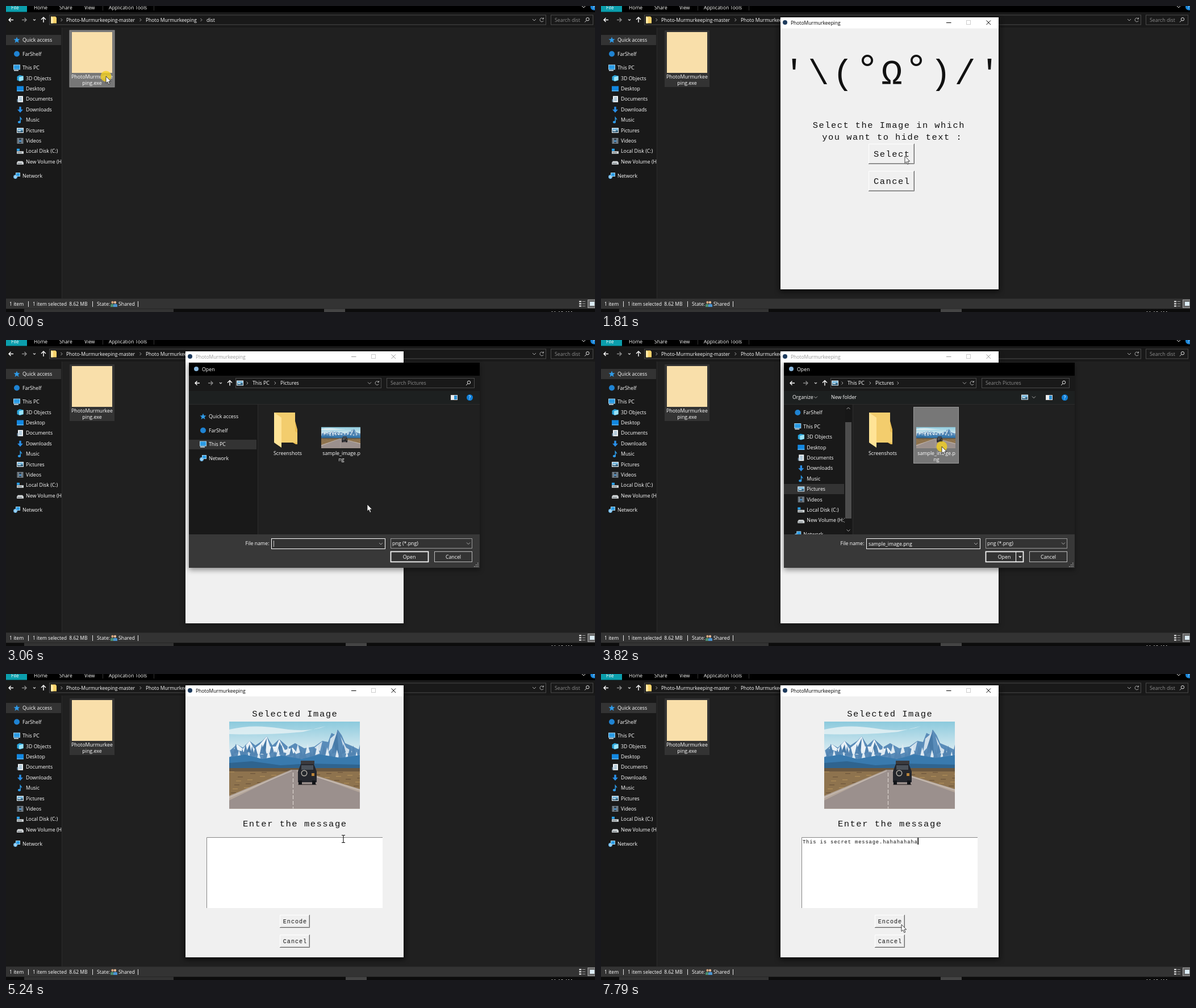
Animation, 1037 px wide and 540 px high, one loop 8 s. Source, as an HTML page:

```html
<!DOCTYPE html>
<html lang="en">
<head>
<meta charset="utf-8">
<title>Hide text in a picture</title>
<style>
  html, body { margin: 0; width: 100%; height: 100%; overflow: hidden; background: #202020; }
  svg { display: block; width: 100vw; height: 100vh; }
  text { font-family: "Open Sans", "Noto Sans", sans-serif; font-size: 8.8px; white-space: pre; }
  .mono { font-family: "Liberation Mono", monospace; letter-spacing: .0977em; }
  .ring { font-size: 71.7px; letter-spacing: 0; }
  .line { fill: none; stroke: #e6e6e6; stroke-width: 1; }
  .light { fill: none; stroke: #fff; }
  .dark { fill: none; stroke: #696969; }
  .down .light { stroke: #696969; }
  .down .dark { stroke: #fff; }
  .down text { transform: translate(1px, 1px); }
</style>
</head>
<body>
<svg id="stage" viewBox="0 0 1037 540" preserveAspectRatio="none"></svg>
<script>
const LOOP = 8000;
const APP = 'PhotoMurmurkeeping';
const MESSAGE = 'This is secret message.hahahahaha';

// drawing helpers
const rect = (x, y, w, h, fill, more = '') =>
  `<rect x="${x}" y="${y}" width="${w}" height="${h}" fill="${fill}" ${more}/>`;
const box = (x, y, w, h, stroke, fill = 'none', sw = 1) =>
  rect(x + .5, y + .5, w - 1, h - 1, fill, `stroke="${stroke}" stroke-width="${sw}"`);
const path = (d, fill, more = '') => `<path d="${d}" fill="${fill}" ${more}/>`;
const line = (d, color = '#e6e6e6', w = 1, more = '') => path(d, 'none', `stroke="${color}" stroke-width="${w}" ${more}`);
const dot = (x, y, r, fill) => `<circle cx="${x}" cy="${y}" r="${r}" fill="${fill}"/>`;
const move = (x, y, body, more = '') => `<g transform="translate(${x} ${y})" ${more}>${body}</g>`;
const group = (id, body, more = '') => `<g id="${id}" ${more}>${body}</g>`;
const text = (x, y, s, fill = '#fff', anchor = 'start', size = 8.8) =>
  `<text x="${x}" y="${y + 3.1}" fill="${fill}" text-anchor="${anchor}" style="font-size:${size}px">${s}</text>`;
// small letters, widely set, with a pitch of .6 size
const mono = (x, y, s, size, more = 'text-anchor="middle"') =>
  `<text class="mono" x="${x + .042 * size}" y="${y}" style="font-size:${.86 * size}px" fill="#111" ${more}>${s}</text>`;
const chevron = (x, y, c = '#aaa') => line(`M${x - 1.5} ${y - 2.5}l2.5 2.5-2.5 2.5`, c);
const drop = (x, y, c = '#aaa') => line(`M${x - 3} ${y - 1.5}l3 3 3-3`, c);
const repeat = (n, make) => Array.from({ length: n }, (_, i) => make(i)).join('');

function button(id, x, y, w, h, label, size, base) {
  return group(id, rect(x, y, w, h, '#f0f0f0') +
    `<path class="light" d="M${x + .5} ${y + h}V${y + .5}H${x + w}"/>` +
    `<path class="dark" d="M${x} ${y + h - .5}H${x + w - .5}V${y}"/>` +
    line(`M${x + 1} ${y + h - 1.5}H${x + w - 1.5}V${y + 1}`, '#b8b8b8') +
    mono(x + w / 2, base, label, size));
}

const icons = {
  star: path('M0-5.5L1.5-1.8 5.5-1.6 2.4 1 3.5 5 0 2.8-3.5 5-2.4 1-5.5-1.6-1.5-1.8Z', '#2f9be8'),
  disc: dot(0, 0, 5, '#1f83d2'),
  pc: box(-6, -5.5, 12, 9, '#a8d8f4', '#2a9be4') + rect(-5, 4, 8, 1.6, '#c8dce8'),
  cube: path('M-5.5-3L-1-5.5 5.5-4V3.5L0 5.5-5.5 3.5Z', '#2aa5dc') + path('M-2-2L5.5-4V3.5L-2 5Z', '#9be3f7'),
  desk: rect(-6, -4.5, 12, 9, '#1287e0') + rect(-6, 3, 12, 1.5, '#5db8f5'),
  doc: rect(-4, -5.5, 9, 11, '#eef3f6') + line('M-2-2.5H3M-2 0H3M-2 2.5H3', '#5b8db0') + rect(-5.5, 0, 2, 5, '#6f8ea6'),
  down: path('M-1.7-5H1.7V0H5L0 5.5-5 0H-1.7Z', '#2a8fe8'),
  note: path('M0-6C1-3 4-3 3 1 2.5-1 1.5-1.5 1-1.5V3.5A2.6 2 0 1 1-.5 2V-6Z', '#2f9be8'),
  pic: box(-6, -4.5, 12, 9, '#f0f4f6', '#79b9df') + rect(-5, 0, 10, 3.5, '#35627e') + rect(-4, 0, 5, 1.5, '#e8f0f0'),
  film: box(-5.5, -5, 11, 10, '#85909a', '#35424d') + line('M-3-4V4M3-4V4', '#b8c1c7') + rect(-2, -1, 4, 3, '#4c8cc0'),
  disk: rect(-6, 0, 12, 4.5, '#d2d6d8') + rect(-5, 2, 8, 1, '#59646a') + rect(-6, -4.5, 5, 4, '#2aa0e8'),
  vol: path('M-4-1H4L6 1.5V5H-6V1.5Z', '#d2d6d8') + rect(-5, 2.5, 8, 1, '#59646a'),
  net: box(-2, -5.5, 8, 7, '#a8d8f4', '#2a9be4') + dot(-2.5, 2, 3.4, '#6db9ea') + line('M-5 2H1M-2.5-1V5', '#d5ecf8', .7)
};
const icon = (name, x, y) => move(x, y, icons[name]);
const folderSmall = move(79, 18.5, path('M0 0H8L10 2V12H0Z', '#f9d36b') + path('M0 0L4 2V12H0Z', '#ffe9a6'));

// the tree of places, shared by both file windows
const places = [['Quick access', 'star', 60], ['FarShelf', 'disc', 84.5], ['This PC', 'pc', 109]];
[['3D Objects', 'cube'], ['Desktop', 'desk'], ['Documents', 'doc'], ['Downloads', 'down'], ['Music', 'note'],
 ['Pictures', 'pic'], ['Videos', 'film'], ['Local Disk (C:)', 'disk'], ['New Volume (H:)', 'vol']]
  .forEach(([name, kind], i) => places.push([name, kind, 127.5 + 18.4 * i, 6]));
places.push(['Network', 'net', 299.5]);
const place = ([name, kind, y, indent = 0]) => icon(kind, 19 + indent, y) + text(29 + indent, y, name);
const tree = places.map(place).join('');

// arrows, address field and search field
function addressBar(dx, y, width, searchX, searchW, hint) {
  const right = 76 + dx + width;
  return move(dx, y, line('M13 0H5M8.5-3.5L5 0 8.5 3.5', '#fff', 1.4) + line('M28 0H36M32.5-3.5L36 0 32.5 3.5', '#8a8a8a', 1.4) +
      line('M48-1L50 1 52-1', '#ccc', 1.2) + line('M66 4.5V-4M62-.5L66-4.5 70-.5', '#fff', 1.4)) +
    box(76 + dx, y - 9, width, 18, '#4a4a4a') + drop(right - 21, y) +
    line(`M${right - 5} ${y - 2}a3.3 3.3 0 1 0 .3 3.5M${right - 4.5} ${y - 4}v2.5h-2.5`, '#aaa') +
    box(searchX, y - 9, searchW, 18, '#4a4a4a') + text(searchX + 7, y, hint, '#8c8c8c') +
    move(searchX + searchW - 11, y, `<circle cx="1" cy="-1.2" r="2.7" class="line"/>` + line('M-1 1L-4 4'));
}

// flat road picture, 230 by 154
const snow = i => path(`M${i * 5.75} ${(46 + 7 * Math.sin(i * 2.3)).toFixed(1)}l4 15-8 3Z`, i % 3 ? '#5284b2' : '#dfeaf2');
const grass = i => rect(i * 71 % 230, 88 + i * 13 % 44, 9, 1.3, i % 2 ? '#6f573c' : '#ad8c58');
const photo = `<g clip-path="url(#photoClip)">` + rect(0, 0, 230, 154, 'url(#sky)') +
  path('M0 14Q40 4 90 12T170 8L130 18Q70 24 0 22Z', '#e9f3f6', 'opacity=".8"') +
  path('M0 52L14 40 24 46 36 34 46 42 58 34 66 26 76 42 88 31 104 45 116 38 132 47 150 44 164 34 174 36 180 20 186 23 191 14 198 24 204 38 216 43 230 50V90H0Z', '#5a8cb9') +
  path('M8 48L14 40 24 48 36 34 44 48 54 40 66 26 72 44 82 44 88 31 98 50 112 46 120 56 96 55 78 54 58 58 34 56Z', '#eaf2f7') +
  path('M178 30L186 23 190 15 187 40 174 54Z M196 26L206 46 222 56 204 56Z M150 46L164 35 160 52Z', '#cfdfeb') +
  path('M54 56L66 29 64 58Z M84 54L89 36 96 56Z M30 54L36 40 39 56Z M181 46L190 18 193 56Z', '#477aa8') +
  repeat(41, snow) +
  path('M0 63L28 58 58 66 92 60 128 66 160 58 196 64 230 59V90H0Z', '#397aae') +
  path('M0 73L40 70 90 77 140 74 230 76V92H0Z', '#2f648f') +
  rect(0, 83, 230, 71, '#8e734e') + path('M0 82H230V88H0Z', '#6b573f') + repeat(70, grass) +
  path('M109 85H120L230 119V154H0V131Z', '#b5a79c') + path('M111 85H118L230 125V154H0V139Z', '#9b908d') +
  line('M110 87L0 134M119 87L230 121', '#cfc5bc', 1) +
  line('M112.5 90V154', '#d9d2cd', 1.2, 'stroke-dasharray="7 3"') +
  path('M122 110H153L154 112H121Z', '#5c5352') + path('M126 75H149L154 88V107H121V88Z', '#24262c') +
  rect(126, 69, 24, 6, '#3b3a3d') + rect(127, 77, 21, 8, '#4b525a') + rect(122, 104, 6, 7, '#121418') + rect(146, 104, 6, 7, '#121418') +
  dot(132, 91, 5.5, '#b5b1a8') + dot(132, 91, 4, '#25282d') + rect(145, 91, 5, 5, '#b98338') + `</g>`;

const explorer = rect(0, 0, 1037, 540, '#202020') + rect(0, 10, 1037, 28, '#191919') + rect(0, 38, 99, 478, '#191919') +
  rect(0, 0, 1037, 11, '#000') + rect(0, 0, 37, 10.5, '#0b9eac') + line('M170.5 0V8M260.5 0V8', '#333') +
  [['File', 9], ['Home', 49], ['Share', 94], ['View', 138], ['Application Tools', 181]].map(([s, x]) => text(x, 2.5, s, '#fff', 'start', 8.5)).join('') +
  drop(1017, 1.5, '#ddd') + dot(1035, 1.5, 6, '#1784d8') + text(1032.5, 1.5, '?') +
  addressBar(0, 24.5, 875, 959, 75, 'Search dist') + folderSmall +
  [98, 237, 344].map(x => chevron(x, 24.5)).join('') +
  text(106, 24.5, 'Photo-Murmurkeeping-master', '#fff', 'start', 8.5) + text(246, 24.5, 'Photo Murmurkeeping', '#fff', 'start', 8.5) + text(353, 24.5, 'dist') +
  line('M98.5 38V516', '#2b2b2b') + rect(0, 51, 97, 18, '#333') + `<g clip-path="url(#treeClip)">${tree}</g>` +
  rect(112, 43, 79, 100, '#333', 'id="tile"') + rect(116, 46, 71, 72, '#f9dfaa') +
  text(151.5, 124.5, 'PhotoMurmurkee', '#fff', 'middle') + text(151.5, 136, 'ping.exe', '#fff', 'middle') +
  rect(0, 516.5, 1037, 18, '#333') + text(6, 526, '1 item', '#fff', 'start', 8.6) +
  text(47, 526, '1 item selected  8.62 MB', '#fff', 'start', 8.5) + text(160, 526, 'State:') + text(198, 526, 'Shared') +
  line('M39.5 521V531M152.5 521V531M232.5 521V531') +
  dot(187.5, 523, 2.2, '#d2a27d') + dot(192, 523, 2.2, '#e4b894') + path('M184 531V527Q187 524 190 527V531Z', '#4b8c6f') + path('M189 531V527Q193 524 196 527V531Z', '#4b93d0') +
  line('M1009 521.5H1013M1009 525.5H1013M1009 529.5H1013', '#eee', 2) + line('M1014.5 521.5H1020M1014.5 525.5H1020M1014.5 529.5H1020', '#999') +
  box(1024, 518, 15, 15, '#a0a0a0', '#666') + rect(1028, 522, 8, 7, '#dcecf5') +
  rect(0, 534.5, 1037, 6, '#0c0c0c') + rect(32, 534.5, 263, 6, '#333') +
  rect(560, 534.5, 37, 6, '#444', 'id="task"') + text(959, 542.5, '11:19 AM');

// opening page of the app
const bouquet = String.raw`@(oo)
(oo)-{*}-)@
@(={*}=)/\)(oo)
(oo(/\)@| (-{*}-)
(={*}=)@(oo)@(/\)
(/\)\(={*}=)/(oo)
@(oo)\(/\)/(={*}=)
(-{*}-)****@/(/\)
|::   |
/::     \
/:::      \
|::        |
|::        |
\::.      /
':______.'
~~~~~~~~`.split('\n');
const menuPage = mono(508, 76, 'Photo Murmurkeeping', 33.3) +
  button('menuEncode', 466, 95, 84, 29, 'Encode', 14.1, 114) + button('menuDecode', 466, 143, 84, 29, 'Decode', 14.1, 162) +
  mono(508, 240, '¯\\_(ツ)_/¯', 61.4) +
  bouquet.map((s, i) => mono(508, 281 + 13.7 * i, s, 12.8, 'text-anchor="middle" font-weight="bold"')).join('');

const ring = next => `<tspan class="ring" dx="-3" dy="-3">°</tspan><tspan dx="3" dy="3">${next}</tspan>`;
const selectPage = mono(512, 137, `'\\(${ring('Ω')}${ring(')')}/'`, 71.7) +
  mono(372, 215, 'Select the Image in which', 17.9, '') + mono(512, 236, 'you want to hide text :', 17.9) +
  button('pick', 471, 243, 81, 36, 'Select', 17.9, 266) + button('quit', 471, 291, 81, 36, 'Cancel', 17.9, 314);

const messagePage = mono(508, 75, 'Selected Image', 18) + move(393, 84, photo) +
  mono(508, 268.5, 'Enter the message', 18) +
  rect(353, 288, 310, 125, '#fff') + line('M353.5 413V288.5H663', '#858585') +
  mono(354.5, 298.5, '', 10.25, 'id="typed"') + rect(0, 289, 1.6, 12, '#000', 'id="caret"') +
  button('encode', 482, 425, 53, 23, 'Encode', 11.8, 440) + button('cancel', 482, 460, 53, 23, 'Cancel', 11.8, 475);

const shadow = (id, x, y, w, h) => rect(x, y, w, h, '#000', `id="${id}" filter="url(#blur)"`);
const app = shadow('appShadow', 314, 24, 388, 480) + rect(316, 20, 384, 480, '#f0f0f0') + rect(316, 20, 384, 19.5, '#fff') +
  dot(324, 29, 4, '#1d3a5c') +
  group('appTitle', text(334, 29.5, APP, 'currentColor', 'start', 8.5) + line('M608 29.5H616.5M678.5 25.5L686 33M686 25.5L678.5 33', 'currentColor')) +
  box(643, 25, 8, 8, '#ccc') + group('menu', menuPage) + group('select', selectPage) + group('message', messagePage);

// file chooser
const folder = path('M472 128H505L513 158V184H510L505 181H472Z', '#e9bd55') +
  path('M472 128H509V161L513 164V181H482Z', '#f3cd6d') + path('M472 128L485 137V190L472 181Z', '#ffe396');
const chooserSkeleton = rect(322, 40, 512, 362, '#fff') + rect(322, 40, 512, 24, '#000') + rect(322, 343, 512, 59, '#383838') +
  rect(422, 353, 41, 12, '#fff') + rect(467, 350, 200, 18, '#fff') + rect(676, 350, 145, 17, '#fff') +
  rect(676, 372, 68, 20, '#fff') + rect(753, 372, 68, 20, '#fff') + rect(821, 389, 13, 13, '#fff');
const collapsed = move(328, 75, rect(-6, 101, 119, 17, '#333') + places.slice(0, 3).map(place).join('')) + move(328, -91, place(places[12]));
const expanded = text(337, 101, 'Organize') + drop(378, 101) + text(405, 101, 'New folder') +
  icon('pic', 746, 101) + drop(762, 101) + chevron(523, 76) + rect(322, 254, 106, 18, '#333') +
  `<g clip-path="url(#chooserClip)">${move(327.3, 43.5, tree)}</g>` +
  rect(430, 114, 11, 229, '#171717') + rect(430, 145, 11, 170, '#4d4d4d') + drop(435.5, 336) + line('M432.5 122L435.5 119 438.5 122', '#aaa') +
  line('M730.5 374V391', '#fff') + path('M735 381.5H741L738 384.5Z', '#fff');
const chooserBody = rect(322, 40, 512, 362, '#202020') + rect(322, 40, 512, 50, '#191919') + rect(322, 40, 512, 23, '#000') +
  rect(322, 90, 512, 24, '#1d2020') + rect(322, 114, 121, 229, '#191919') + line('M443.5 114V343M322 113.5H834', '#2c2c2c') +
  addressBar(328, 76, 257, 670, 155, 'Search Pictures') + icon('pic', 412, 76) + chevron(425, 76) + text(434, 76, 'This PC') +
  chevron(474, 76) + text(483, 76, 'Pictures') +
  box(783, 97, 12, 9, '#ddd', '#eee') + rect(789, 98, 5, 7, '#2f8fd0') + dot(816.5, 101.5, 5.5, '#0f7fd8') + text(816.5, 101.5, '?', '#fff', 'middle') +
  group('picked', box(550, 118, 80, 100, '#999', '#777')) + folder + text(496, 199.5, 'Screenshots', '#fff', 'middle') +
  move(555, 153.5, `<g transform="scale(.3 .242)">${photo}</g>`) +
  text(590.5, 199.5, 'sample_image.p', '#fff', 'middle') + text(590.5, 211, 'ng', '#fff', 'middle') +
  rect(322, 343, 512, 59, '#383838') + text(463.5, 359, 'File name:', '#fff', 'end') +
  box(467, 350, 201, 19, '#fff', '#333') + drop(660, 359.5) + box(677, 350, 144, 18, '#999', '#333') + text(680, 359, 'png (*.png)') + drop(814, 359) +
  group('fileName', text(471, 359.5, 'sample_image.png')) + group('fileCaret', line('M471.5 354V365', '#ccc')) +
  box(677, 373, 67, 19, '#fff', '#333', 1.7) + text(710, 382.5, 'Open', '#fff', 'middle') +
  box(754, 373, 67, 19, '#bbb', '#333') + text(787.5, 382.5, 'Cancel', '#fff', 'middle') +
  [[830, 394], [830, 397], [827, 397], [830, 400], [827, 400], [824, 400]].map(([x, y]) => rect(x, y - 1, 1.5, 1.5, '#aaa')).join('') +
  group('collapsed', collapsed) + group('expanded', expanded);
const chooser = shadow('chooserShadow', 322, 44, 512, 362) + group('body', chooserBody) + group('skeleton', chooserSkeleton) +
  group('chooserIcon', dot(335, 51, 4, '#87b6dc')) + group('chooserTitle', text(345, 51.5, 'Open'));

const clip = (id, x, y, w, h) => `<clipPath id="${id}">${rect(x, y, w, h, '#000')}</clipPath>`;
stage.innerHTML = `<defs><filter id="blur" x="-10%" y="-10%" width="120%" height="120%"><feGaussianBlur stdDeviation="5"/></filter>
  <linearGradient id="sky" x2="0" y2="1"><stop stop-color="#8ccadd"/><stop offset=".35" stop-color="#dcecf2"/></linearGradient>` +
  clip('treeClip', 0, 38, 98, 478) + clip('chooserClip', 322, 114, 107, 229) + clip('photoClip', 0, 0, 230, 153.5) + '</defs>' +
  explorer + group('app', app) + group('chooser', chooser) + group('pointer',
    group('halo', dot(0, 0, 9.5, '#f2d020'), 'opacity=".8"') +
    group('arrow', path('M0 0V12.2L2.8 9.7 4.8 14.4 6.8 13.5 4.9 9H8.6Z', '#fff', 'stroke="#111" stroke-width=".8"')) +
    group('beam', line('M-3-6.5H-1Q0-6.5 0-5.5 0-6.5 1-6.5H3M0-6V6M-3 6.5H-1Q0 6.5 0 5.5 0 6.5 1 6.5H3', '#111', 1.1)));

// step tables: time, then values held until the next row
const pointerSteps = [[0, 176, 124], [390, 215, 122], [470, 300, 118], [550, 400, 112], [630, 470, 110], [710, 515, 109], [790, 531, 109], [870, 535, 109],
  [1570, 535, 130], [1650, 535, 190], [1730, 535, 245], [1810, 535, 265], [2190, 538, 265], [2900, 556, 270], [2980, 604, 283], [3060, 636, 290],
  [3290, 630, 262], [3360, 618, 230], [3440, 607, 205], [3520, 602, 192], [3590, 600, 188],
  [5070, 600, 215], [5150, 598, 252], [5240, 594, 291], [5320, 576, 302], [5390, 566, 306],
  [6930, 564, 325], [7010, 556, 360], [7090, 545, 400], [7170, 535, 428], [7250, 530, 440], [7330, 529, 442]];
const appSteps = [[0, 0, .95], [230, .35, .965], [310, .8, .99], [390, 1, 1]];
const chooserSteps = [[0, 0, 1], [2830, .36, .968], [2900, .8, .99], [2980, 1, 1], [3990, .75, .99], [4070, .48, .977], [4150, .23, .965], [4230, 0, 1]];
const haloSpans = [[0, 150], [1250, 1400], [2190, 2340], [3820, 4230], [5560, 5710]];
const caretSpans = [[5560, 6170], [6480, 7090], [7330, 7560], [7790, LOOP]];

const $ = id => document.getElementById(id);
const at = (steps, t) => steps.findLast(s => s[0] <= t).slice(1);
const within = (spans, t) => spans.some(([a, b]) => t >= a && t < b);
const show = (id, on) => $(id).style.display = on ? '' : 'none';
const fade = (id, [alpha, scale], x, y) => {
  show(id, alpha > 0);
  $(id).setAttribute('opacity', alpha);
  $(id).setAttribute('transform', `translate(${x} ${y}) scale(${scale}) translate(${-x} ${-y})`);
};

function draw(t) {
  const opened = t >= 230, active = t < 2340 || t >= 3990, closing = t >= 3990;
  $('tile').setAttribute('fill', opened ? '#333' : '#777');
  $('tile').setAttribute('stroke', opened ? 'none' : '#919191');
  $('task').setAttribute('x', opened ? 598 : 560);
  fade('app', at(appSteps, t), 508, 260);
  $('appShadow').setAttribute('opacity', active ? .6 : .25);
  $('appTitle').style.color = active ? '#000' : '#999';

  show('menu', t < 1400);
  show('select', t >= 1400 && t < 4610);
  show('message', t >= 4610);
  $('menuEncode').classList.toggle('down', t >= 1250 && t < 1400);
  $('pick').classList.toggle('down', t >= 2190 && t < 2340);

  fade('chooser', at(chooserSteps, t), 578, 221);
  $('chooserShadow').setAttribute('opacity', .4);
  show('skeleton', t < 2980);
  show('body', t >= 2980);
  show('collapsed', t < 3140);
  show('expanded', t >= 3140);
  show('picked', t >= 3820);
  show('fileName', t >= 3820);
  show('fileCaret', t < 3820);
  show('chooserIcon', !closing);
  $('chooserTitle').setAttribute('transform', `translate(${closing ? -16 : 0} 0)`);

  const typed = t < 6560 ? '' : t < 6710 ? 'T' : MESSAGE;
  $('typed').textContent = typed;
  $('caret').setAttribute('x', 354.5 + typed.length * 6.15);
  show('caret', within(caretSpans, t));

  const [x, y] = at(pointerSteps, t);
  const overText = t >= 4610 && y > 288 && y < 413;
  $('pointer').setAttribute('transform', `translate(${x} ${y})`);
  show('halo', within(haloSpans, t));
  show('beam', overText);
  show('arrow', !overText);
}

const start = performance.now();
function tick() {
  draw((performance.now() - start) % LOOP);
  requestAnimationFrame(tick);
}
draw(0);
requestAnimationFrame(tick);
</script>
</body>
</html>
```
